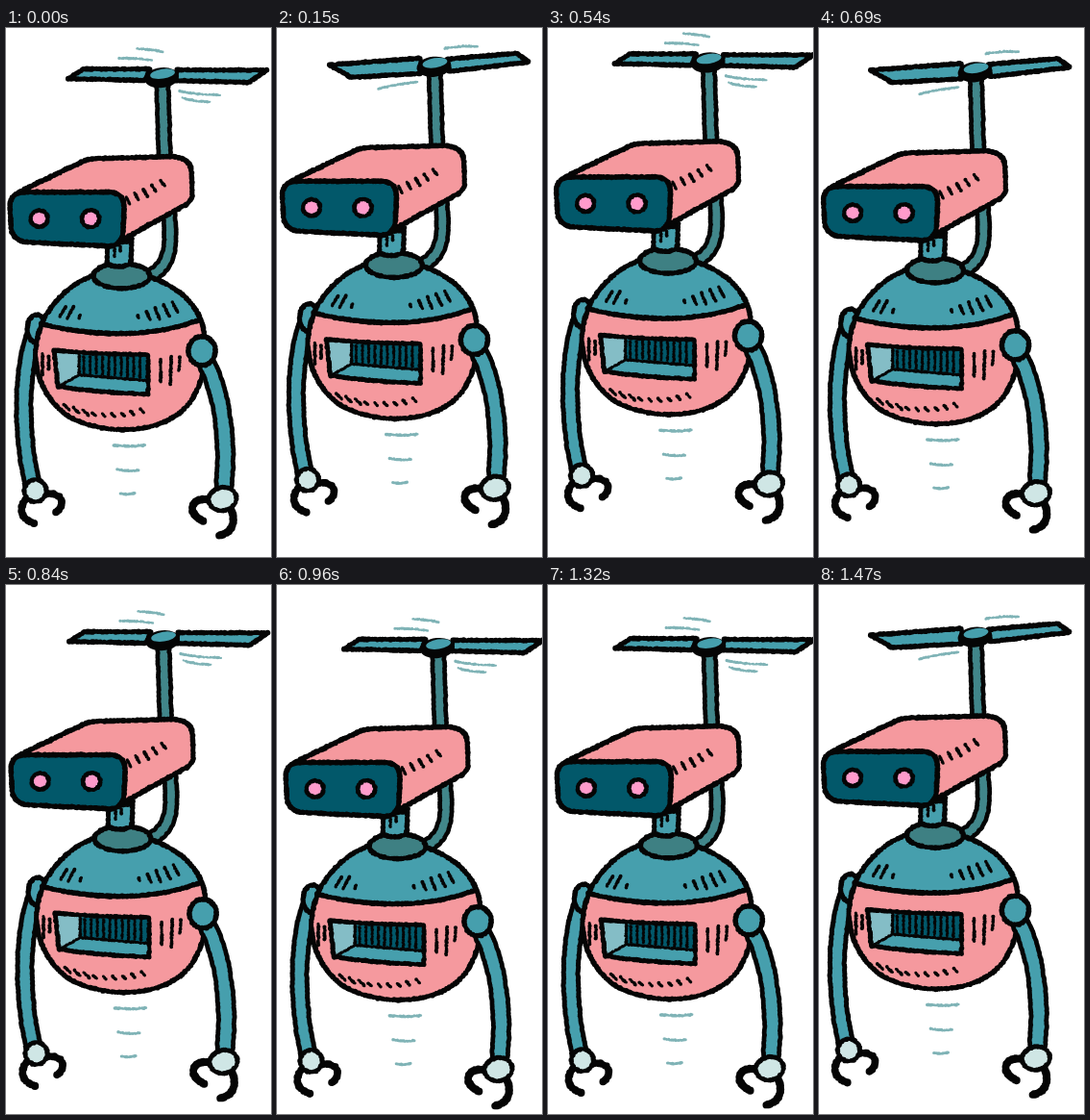
Animation of 276 by 550 pixels, one loop 1.5 s. Source, as an HTML page with a canvas:

```html
<!DOCTYPE html>
<html lang="en">
<head>
<meta charset="utf-8">
<title>Hovering robot</title>
<style>
html, body { margin: 0; width: 100%; height: 100%; overflow: hidden; background: #fff; }
canvas { display: block; width: 276px; height: 550px; }
svg { position: absolute; width: 0; height: 0; }
</style>
</head>
<body>
<canvas id="stage"></canvas>
<svg><path id="guide" fill="none"/></svg>
<script>
const WIDTH = 276, HEIGHT = 550, LOOP = 1500, STEP = 30;
const INK = '#050505', TEAL = '#469fad', PINK = '#f5999e', NAVY = '#02586a',
      POLE = '#41868a', COLLAR = '#3e8083', PALE = '#cfe6e5', GLASS = '#84bdc6',
      EYE = '#ff9bcb', AIR = '#7fb3b6';

const canvas = document.getElementById('stage');
const guide = document.getElementById('guide');
const ctx = canvas.getContext('2d');
const ratio = window.devicePixelRatio || 1;
canvas.width = WIDTH * ratio;
canvas.height = HEIGHT * ratio;

const brushCache = new Map();

function noise(n) {
  const v = Math.sin(n * 12.9898) * 43758.5453;
  return v - Math.floor(v) - 0.5;
}

// A rough brush line: overlapping dabs of slightly uneven size and place.
function brush(d, width) {
  const key = d + '|' + width;
  if (brushCache.has(key)) return brushCache.get(key);
  const dabs = new Path2D();
  guide.setAttribute('d', d);
  const length = guide.getTotalLength();
  const count = Math.max(2, Math.ceil(length / 1.4));
  for (let i = 0; i <= count; i++) {
    const p = guide.getPointAtLength(length * i / count);
    const seed = i + p.x * 0.37;
    const x = p.x + noise(seed) * 0.7, y = p.y + noise(seed + 50) * 0.7;
    const r = width / 2 + noise(seed + 90) * 0.7;
    dabs.moveTo(x + r, y);
    dabs.arc(x, y, r, 0, Math.PI * 2);
  }
  brushCache.set(key, dabs);
  return dabs;
}

function line(d, width = 5, color = INK) {
  ctx.fillStyle = color;
  ctx.fill(brush(d, width));
}

function shape(d, fill, width = 5.2) {
  ctx.fillStyle = fill;
  ctx.fill(new Path2D(d));
  if (width) line(d, width);
}

function oval(x, y, rx, ry, fill, width = 5.2, tilt = 0) {
  const a = tilt * Math.PI / 180;
  const dx = rx * Math.cos(a), dy = rx * Math.sin(a);
  const arc = `A${rx} ${ry} ${tilt} 0 1 `;
  shape(`M${x - dx} ${y - dy}${arc}${x + dx} ${y + dy}${arc}${x - dx} ${y - dy}Z`, fill, width);
}

function tube(d, fill, outer, inner) {
  line(d, outer);
  line(d, inner, fill);
}

// Each mark is [x, y, dx, dy].
function hatch(marks, width = 3.6) {
  for (const [x, y, dx, dy] of marks) line(`M${x} ${y}l${dx} ${dy}`, width);
}

function drawAirBelow() {
  line('M112 433Q128 435 145 433', 3.2, AIR);
  line('M116 458Q126 461 138 459', 3.2, AIR);
  line('M119 483Q127 485 134 483', 3.2, AIR);
}

function drawLeftArm() {
  tube('M28 322C14 365 17 430 27 472', TEAL, 20, 10);
  oval(32, 312, 10, 14.5, TEAL);
  line('M22 488C12 498 15 510 29 514', 7.5);
  line('M41 484C60 481 62 496 52 503', 7.5);
  oval(30.5, 480.5, 11.5, 11.5, PALE, 4.8);
}

function drawRightArm() {
  tube('M210 350C226 385 231 430 227 474', TEAL, 21, 11.5);
  line('M213 490C193 486 186 502 205 512', 8);
  line('M234 499C240 513 236 524 222 527', 8);
  oval(225.5, 489, 14.5, 12, PALE, 4.8, -12);
  oval(204, 335, 14, 15, TEAL);
}

function drawWindow() {
  const frame = 'M50 334Q80 338 148 339L148 380Q90 378 54 372Z';
  shape(frame, TEAL, 0);
  shape('M51 335L76 339L76 360L55 371Z', GLASS, 0);
  shape('M76 339L147 340L147 365L76 360Z', NAVY, 0);
  for (let x = 81; x < 146; x += 6.5) line(`M${x} 341V${358 + (x - 80) * 0.07}`, 3);
  line('M76 338V360L55 372M76 360L147 366', 3.4);
  line(frame, 4.8);
}

function drawBody() {
  shape('M38 306C20 345 38 386 66 403.5C100 422 148 421 176 403C204 386 214 340 203 302Q120 330 38 306Z', PINK);
  shape('M37 307C46 285 70 262 96 255L148 258C174 265 194 282 203 302Q165 317 118 317Q70 316 37 307Z', TEAL);
  hatch([[62, 289, -6, 10], [70, 289, -6, 12], [77, 298, -1, 3],
         [137, 298, 1, 3], [146, 294, 4, 8], [155, 290, 5, 12],
         [164, 287, 6, 12], [173, 284, 6, 11]]);
  hatch([[38, 338, 0, 22], [44.5, 341, 0, 13], [161, 344, 0, 23],
         [172, 341, -1, 29], [181, 342, -1, 13]]);
  for (let i = 0; i < 9; i++) {
    const x = 60 + i * 10;
    const y = 402 - 0.004 * (x - 106) ** 2;
    const size = i < 3 ? 6 : 3;
    line(`M${x} ${y - size / 2}l${size} ${size}`, 3.4);
  }
  drawWindow();
}

function drawNeck() {
  oval(120.5, 257, 29.5, 13, COLLAR);
  shape('M106 218L105 244Q117 251 130 244L131 218Z', TEAL);
  line('M107 223L130 221', 5);
  hatch([[113, 227, 0, 10], [119, 226, 0, 6]], 3.4);
}

function drawHead() {
  shape('M13 170L80 138Q87 135 96 135L173 133Q192 134 193 148L194 172Q194 179 187 183L122 219L60 205Z', PINK, 5.4);
  shape('M20 170L106 170Q123 170 123 186L122 210Q121 227 105 226L22 222Q5 220 5 204L4 185Q4 170 20 170Z', NAVY, 5.4);
  oval(34.5, 197.5, 9, 8.6, EYE, 4.6);
  oval(88, 197.5, 9, 8.8, EYE, 4.6);
  hatch([[125, 175, 4, 7], [134, 171, 4, 7], [143, 167, 4, 7], [152, 163, 4, 6], [161, 158, 4, 5]]);
}

function drawRotor(swung) {
  if (swung) {
    shape('M53 49L148 42L148 58L76 62Z', TEAL);
    shape('M176 43L248 37L261 46L178 56Z', TEAL);
    line('M173 32Q190 29 207 30', 2.8, AIR);
    line('M104 74Q123 69 145 67', 2.8, AIR);
  } else {
    shape('M65 52L80 42L150 42L145 54Z', TEAL);
    shape('M178 43L272 43L252 56L176 54Z', TEAL);
    line('M136 21Q148 21 163 24', 2.8, AIR);
    line('M118 31Q134 30 152 33', 2.8, AIR);
    line('M181 65Q200 69 223 69', 2.8, AIR);
    line('M184 72Q197 76 212 76', 2.8, AIR);
  }
  oval(162, 51, 18, 10.5, INK, 0, -6);
  oval(163, 47, 13, 5, TEAL, 0, -9);
}

function drawRobot(step) {
  drawAirBelow();
  drawLeftArm();
  tube('M163 60L165 135L170 195C172 225 172 244 152 256', POLE, 17, 7.5);
  drawBody();
  drawNeck();
  drawHead();
  drawRightArm();
  drawRotor(step % 2 === 1);
}

// Rise and fall once per loop while swaying sideways twice.
function hover(t) {
  const a = t / LOOP * Math.PI * 2;
  return {
    x: 4.1 - 4.1 * Math.cos(2 * a - 0.17) - 1.2 * Math.sin(a),
    y: 0.1 - 19.2 * Math.sin(a - 0.03)
  };
}

const start = performance.now();

function render() {
  const step = Math.floor(((performance.now() - start) % LOOP) / STEP);
  const { x, y } = hover(step * STEP);
  ctx.setTransform(ratio, 0, 0, ratio, 0, 0);
  ctx.fillStyle = '#fff';
  ctx.fillRect(0, 0, WIDTH, HEIGHT);
  ctx.translate(x, y);
  drawRobot(step);
  requestAnimationFrame(render);
}

render();
</script>
</body>
</html>
```
